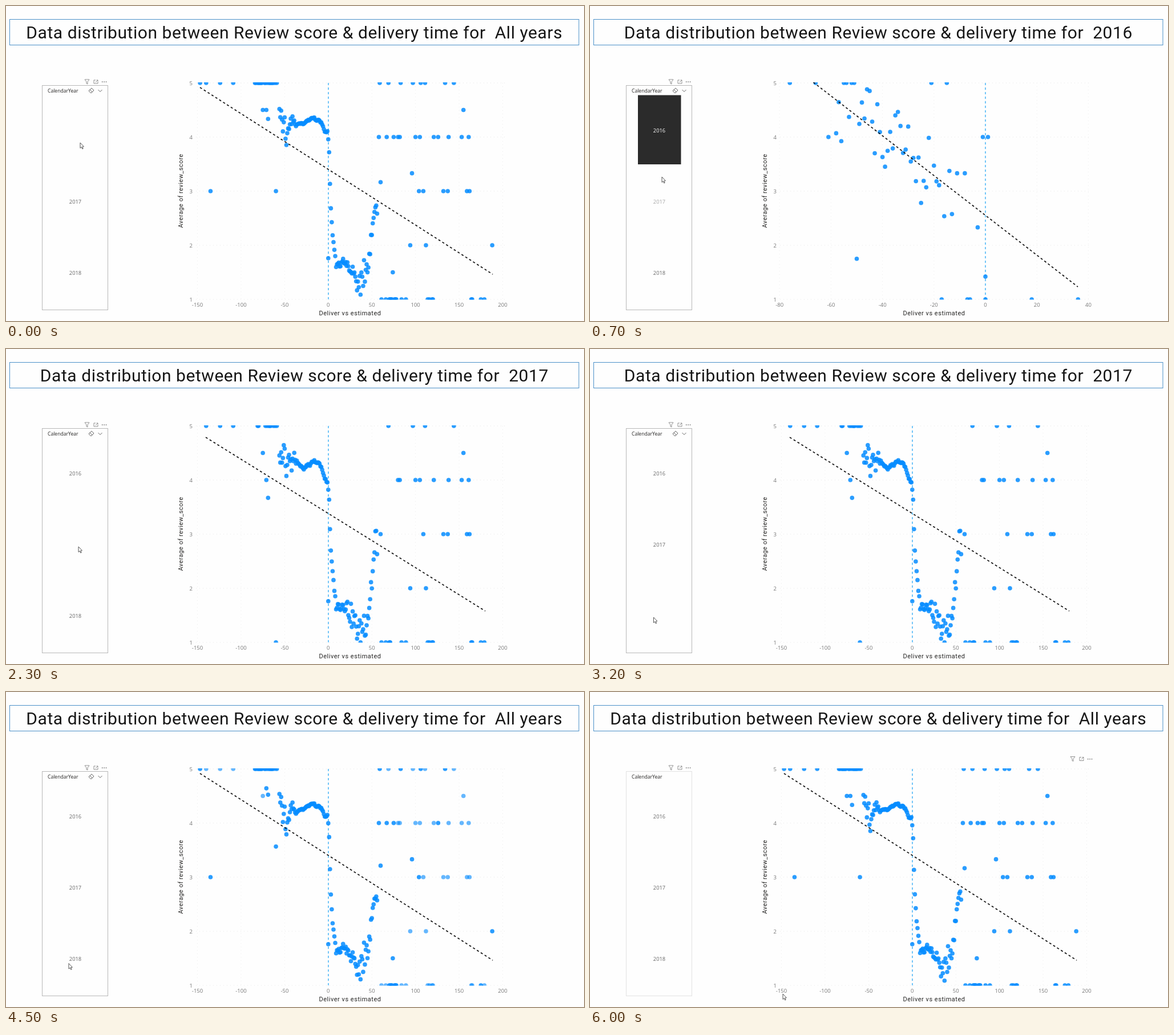
Animation of 1013x553 px, one loop 6.1 s. Source, as an HTML page with a canvas:

```html
<!DOCTYPE html>
<html lang="en">
<head>
<meta charset="utf-8">
<title>Review score and delivery time</title>
<style>
  html, body { margin: 0; width: 100%; height: 100%; overflow: hidden; background: #fefefe; }
  canvas { display: block; }
</style>
</head>
<body>
<canvas id="stage" width="1013" height="553"></canvas>
<script>
const ctx = document.getElementById('stage').getContext('2d');
const LOOP = 6100, STEP = 100, MORPH = 300;
const SANS = '"Open Sans", sans-serif', TITLE = 'Roboto, sans-serif';

const lerp = (a, b, k) => a + (b - a) * k;
const clamp = (v, min, max) => Math.min(max, Math.max(min, v));
const ease = k => k < 0.5 ? 4 * k ** 3 : 1 - 4 * (1 - k) ** 3;

function random(x, seed) {
  const v = Math.sin(x * 12.9898 + seed * 78.233) * 43758.5453;
  return v - Math.floor(v);
}
const jitter = (x, seed) => random(x, seed) * 2 - 1;

// Piecewise linear path through [position, ...values] keys.
function follow(keys, at) {
  const i = Math.max(1, keys.findIndex(key => key[0] >= at));
  const [a, b] = [keys[i - 1], keys[i]];
  const k = (at - a[0]) / (b[0] - a[0]);
  return a.slice(1).map((v, n) => lerp(v, b[n + 1], k));
}

// Every data set is a map from x (days) to y (score).
const BLANK = 0.01;

function addRow(points, y, from, to, chance, seed) {
  for (let x = from; x <= to; x++)
    if (random(x, seed) < chance) points.set(x, y);
}

function addLevels(points, levels) {
  for (const [y, xs] of Object.entries(levels))
    for (const x of xs) points.set(x, +y);
  return points;
}

// Scores scatter more the further a delivery is from its estimate.
const spread = x => x < 0 ? 0.03 + 0.018 * Math.max(0, -35 - x) : 0.02 + 0.009 * Math.max(0, x - 5);

function yearData(curve, seed, late, outliers) {
  const points = new Map([[BLANK, 1.76]]);
  for (let x = -56; x <= 56; x++)
    points.set(x, clamp(follow(curve, x)[0] + spread(x) * jitter(x, seed), 1, 5));
  addRow(points, 5, -84, -59, 0.6, seed);
  addRow(points, 1, 57, late, 0.35, seed);
  return addLevels(points, outliers);
}

const data2017 = yearData([
  [-56, 4.4], [-44, 4.25], [-39, 4.4], [-29, 4.2], [-15, 4.35], [-10, 4.31], [-5, 4.08], [-1, 3.94], [0, 3.83],
  [1, 3.64], [2, 3.1], [3, 2.68], [5, 2.3], [9, 1.66], [20, 1.72], [36, 1.15], [46, 1.6], [56, 3]
], 3, 91, {
  5: [-140, -124, -109, 69, 97, 111, 144], 4.5: [-75, 155],
  4: [-71, 80, 82, 100, 105, 121, 138, 153, 161], 3.67: [-69],
  3: [60, 109, 132, 137, 159, 162], 2: [94, 112], 1: [-60]
});
addRow(data2017, 1, 113, 120, 0.3, 5);
addRow(data2017, 1, 163, 181, 0.3, 5);

const data2018 = yearData([
  [-56, 4.4], [-47, 3.75], [-42, 4.3], [-37, 4.1], [-33, 4.25], [-20, 4.36], [-6, 4.27], [-3, 4.16], [-1, 4.23],
  [0, 4.1], [1, 3.78], [2, 3.19], [3, 2.68], [5, 2.07], [9, 1.63], [16, 1.7], [34, 1.35], [46, 1.8], [56, 2.5]
], 8, 79, {
  5: [-147, -71, -60, 59, 83, 106, 134], 4: [58, 67, 75, 126], 3.33: [60, 96],
  3: [-135, 104], 2: [188], 1.5: [74], 1: [175]
});

const data2016 = new Map();
for (let x = -58; x <= -13; x++)
  data2016.set(x, clamp(2.55 - 0.037 * x + 0.7 * jitter(x, 2), 1, 5));
addLevels(data2016, {
  5: [-76, -66, -55, -54, -51, -21, -15], 4: [-61, -1, 1], 3.33: [-11, -8],
  2.33: [-3], 1.75: [-50], 1.42: [0], 1: [-17, -7, -6, BLANK, 18, 36]
});

// All years: mean of the two large years.
const dataAll = new Map([...data2017, ...data2018]);
for (const [x, y] of data2017)
  if (data2018.has(x)) dataAll.set(x, (y + data2018.get(x)) / 2);

const wide = { left: 336, zero: 564.8, unit: 1.5285, first: -150, last: 200, every: 50 };
const narrow = { left: 333, zero: 693, unit: 4.51, first: -80, last: 40, every: 20 };

const allYears = { name: 'All years', points: dataAll, scale: wide, trend: [340, 143, 853, 471] };
const views = [
  { ...allYears, at: -MORPH },
  { at: 200, name: '2016', points: data2016, scale: narrow, trend: [391.5, 134, 855, 493] },
  { at: 1300, name: '2017', points: data2017, scale: wide, trend: [350, 155, 840, 460] },
  { at: 3300, name: '2018', points: data2018, scale: wide, trend: [383, 132, 799, 515] },
  { ...allYears, at: 4324 }
];

const tiles = [
  { year: '2016', on: 0, off: 1200 },
  { year: '2017', on: 1200, off: 3200 },
  { year: '2018', on: 3200, off: 4200 }
];

const cursorPath = [
  [0, 130, 240], [300, 130, 243], [700, 126, 300], [1300, 124, 326], [2300, 127, 347], [2700, 126, 380],
  [3100, 112, 470], [3700, 109, 476], [5350, 111, 477], [6000, 338, 530]
];

const plotX = (x, scale) => scale.zero + x * scale.unit;
const plotY = y => 515 - 95 * (y - 1);

function text(str, x, y, font, color, { align = 'center', spacing = 0 } = {}) {
  ctx.font = font;
  ctx.fillStyle = color;
  ctx.textAlign = align;
  ctx.letterSpacing = spacing + 'px';
  ctx.fillText(str, x, y);
}

function line(points, color, width = 1, dash = []) {
  ctx.beginPath();
  for (let i = 0; i < points.length; i += 2) ctx.lineTo(points[i], points[i + 1]);
  ctx.strokeStyle = color;
  ctx.lineWidth = width;
  ctx.setLineDash(dash);
  ctx.stroke();
  ctx.setLineDash([]);
}

function box(x, y, w, h, color) {
  ctx.strokeStyle = color;
  ctx.lineWidth = 1;
  ctx.strokeRect(x, y, w, h);
}

function headerIcons(x, y) {
  const grey = '#777';
  line([x - 4, y - 4, x + 4, y - 4, x + 1, y, x + 1, y + 4, x - 1, y + 3, x - 1, y, x - 4, y - 4], grey, 0.8);
  line([x + 15, y - 3, x + 12, y - 3, x + 12, y + 3, x + 19, y + 3, x + 19, y], grey, 0.8);
  line([x + 15, y + 1, x + 19, y - 3], grey, 0.8);
  line([x + 16.5, y - 3, x + 19, y - 3, x + 19, y - 0.5], grey, 0.8);
  ctx.fillStyle = '#555';
  for (let i = 0; i < 3; i++) ctx.fillRect(x + 26 + i * 3.4, y - 0.5, 1.4, 1.4);
}

function drawSlicer(t, [cursorX, cursorY]) {
  const inside = cursorX < 179;
  box(63.5, 139.5, 115, 394, inside ? '#b8b8b8' : '#e2e2e2');
  headerIcons(142, 133);
  text('CalendarYear', 73, 151.5, `8.6px ${SANS}`, '#252423', { align: 'left' });
  if (inside) {
    line([145, 149, 150, 144, 154, 148, 149, 153, 145, 149], '#555', 0.9);
    line([147, 147, 151, 151], '#555', 0.9);
    line([161.5, 147, 165, 150.5, 168.5, 147], '#555', 0.9);
  }
  tiles.forEach(({ year, on, off }, i) => {
    const top = 156.5 + i * 125;
    const hovered = inside && cursorY > top && cursorY < top + 121.5;
    const selected = t >= on && t < off;
    if (selected && hovered) return;
    if (selected) {
      ctx.fillStyle = '#2b2b2b';
      ctx.fillRect(84, top, 75.5, 121.5);
    }
    const color = selected ? '#fff' : hovered && t < on ? '#a6a6a6' : '#666';
    text(year, 121.5, top + 65.2, `9.3px ${SANS}`, color);
  });
}

function drawGrid({ scale }) {
  for (let y = 1; y <= 5; y++) {
    line([333, plotY(y), 874, plotY(y)], '#e6e6e6', 1, [1, 5]);
    text(y, 327, plotY(y) + 3.5, `9.5px ${SANS}`, '#777', { align: 'right' });
  }
  for (let x = scale.first; x <= scale.last; x += scale.every) {
    line([plotX(x, scale), 135, plotX(x, scale), 515], '#ececec', 1, [1, 5]);
    text(x, plotX(x, scale), 527.5, `9.5px ${SANS}`, '#777');
  }
  const label = `11px ${TITLE}`;
  text('Deliver vs estimated', 603, 543, label, '#252423', { spacing: 0.52 });
  ctx.save();
  ctx.translate(310, 324.5);
  ctx.rotate(-Math.PI / 2);
  text('Average of review_score', 0, 0, label, '#252423', { spacing: 0.5 });
  ctx.restore();
}

function dot(x, y, opacity) {
  ctx.globalAlpha = 0.85 * opacity;
  ctx.beginPath();
  ctx.arc(x, y, 3.8, 0, 2 * Math.PI);
  ctx.fill();
}

function drawDots(from, to, k) {
  const shift = to.scale.left - from.scale.left;
  ctx.fillStyle = '#058cff';
  for (const x of new Set([...from.points.keys(), ...to.points.keys()])) {
    const before = from.points.get(x), after = to.points.get(x);
    const oldX = plotX(x, from.scale) + shift, newX = plotX(x, to.scale);
    if (before && after) dot(lerp(oldX, newX, k), plotY(lerp(before, after, k)), 1);
    else if (after) dot(newX, plotY(after), k);
    else if (k < 1) dot(oldX, plotY(before), 1 - k);
  }
  ctx.globalAlpha = 1;
}

function drawChart(t) {
  const index = views.findLastIndex(v => v.at <= t);
  const view = views[index], previous = views[Math.max(0, index - 1)];
  const k = ease(Math.min(1, (t - view.at) / MORPH));
  text('Data distribution between Review score & delivery time for  ' + view.name,
    505.3, 56.5, `30px ${TITLE}`, '#161616', { spacing: 0.56 });
  drawGrid(view);
  ctx.save();
  ctx.beginPath();
  ctx.rect(325, 134, 560, 381.5);
  ctx.clip();
  const zero = Math.round(view.scale.zero);
  line([zero, 135, zero, 515], '#74c6f8', 2, [4, 4]);
  drawDots(previous, view, k);
  line(view.trend, '#111', 1.7, [4, 4]);
  ctx.restore();
}

function drawCursor([x, y]) {
  ctx.beginPath();
  [[0, 0], [0, 9.5], [2.2, 7.6], [3.8, 11], [5.2, 10.3], [3.7, 7.1], [6.4, 6.8]]
    .forEach(([dx, dy]) => ctx.lineTo(x + dx, y + dy));
  ctx.closePath();
  ctx.fillStyle = '#fff';
  ctx.fill();
  ctx.strokeStyle = '#444';
  ctx.lineWidth = 0.9;
  ctx.stroke();
}

function draw(now) {
  const t = Math.floor((now % LOOP) / STEP) * STEP;
  const cursor = follow(cursorPath, t);
  ctx.fillStyle = '#fefefe';
  ctx.fillRect(0, 0, 1013, 553);
  box(6.5, 23.5, 997.5, 45, '#4a90c8');
  drawSlicer(t, cursor);
  drawChart(t);
  if (cursor[0] > 320) headerIcons(846, 117.5);
  drawCursor(cursor);
  requestAnimationFrame(draw);
}
requestAnimationFrame(draw);
</script>
</body>
</html>
```
